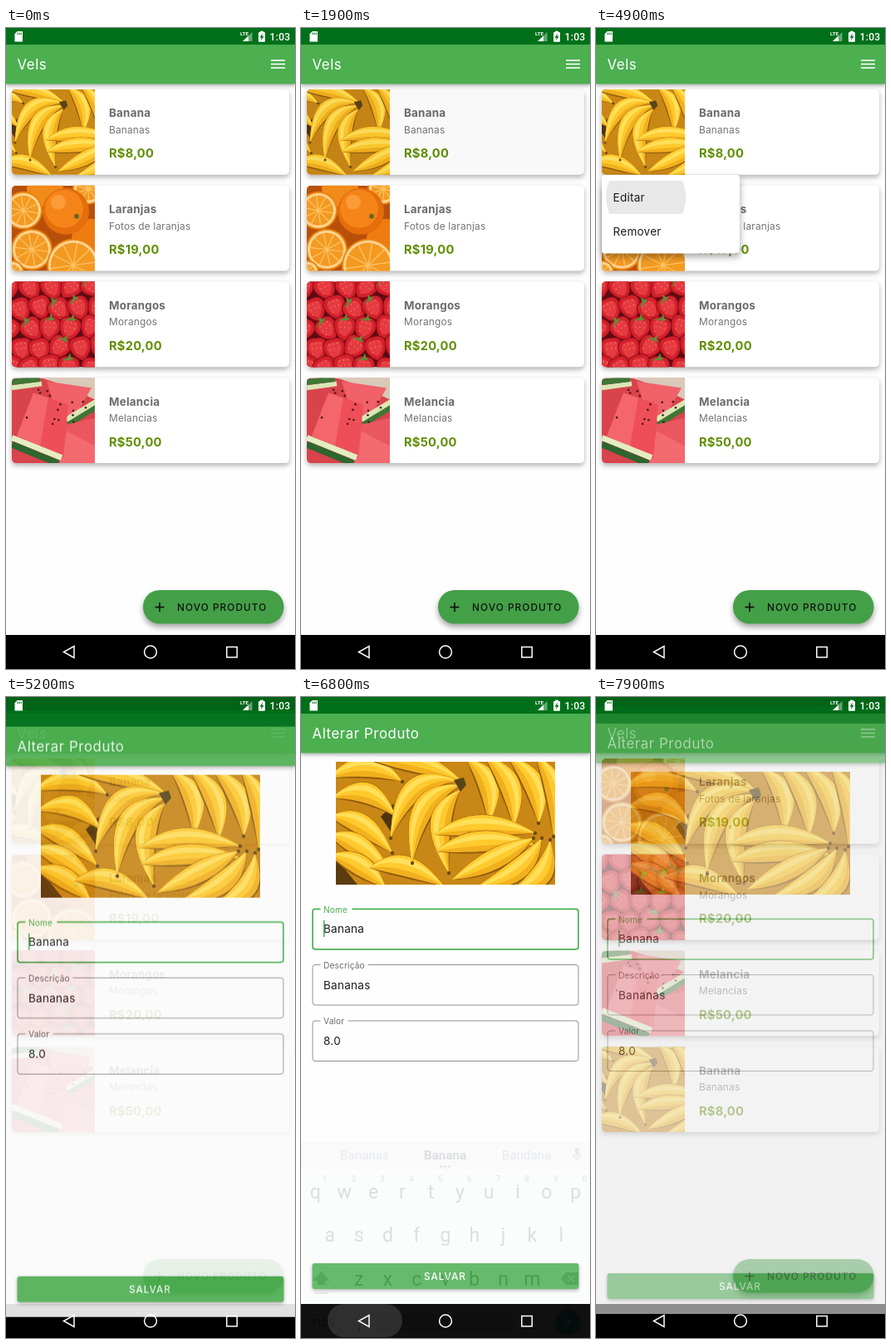
An HTML page with a canvas for the animation above (8 s loop, 348 by 772 pixels).

```html
<!DOCTYPE html>
<html lang="pt-BR">
<head>
<meta charset="utf-8">
<title>Produtos</title>
<style>
html, body { margin: 0; width: 100%; height: 100%; overflow: hidden; background: #fefefe; }
canvas { display: block; width: 348px; height: 772px; }
</style>
</head>
<body>
<canvas id="stage"></canvas>
<script>
const W = 348, H = 772, LOOP = 8000;
const GREEN = '#4caf50', DARK = '#00701a', PAGE = '#fefefe';
const SANS = 'Inter, "Open Sans", sans-serif', KEYS = 'Roboto, sans-serif';
const dpr = window.devicePixelRatio || 1;

function sized(canvas) {
  canvas.width = W * dpr;
  canvas.height = H * dpr;
  const c = canvas.getContext('2d');
  c.scale(dpr, dpr);
  return c;
}
const main = sized(document.getElementById('stage'));
const buffer = sized(document.createElement('canvas'));
let g = main;

const clamp = v => Math.max(0, Math.min(1, v));
const ramp = (t, start, length) => clamp((t - start) / length);
const hash = n => { const v = Math.sin(n * 127.1) * 43758.5453; return v - Math.floor(v); };

// Draws a group with one shared opacity and vertical shift.
function layer(alpha, dy, draw) {
  if (alpha <= 0) return;
  buffer.clearRect(0, 0, W, H);
  g = buffer;
  draw();
  g = main;
  g.save();
  g.globalAlpha = alpha;
  g.drawImage(buffer.canvas, 0, dy, W, H);
  g.restore();
}

function rect(x, y, w, h, color) {
  g.fillStyle = color;
  g.fillRect(x, y, w, h);
}

function roundPath(x, y, w, h, r) {
  g.beginPath();
  g.roundRect(x, y, w, h, r);
}

function round(x, y, w, h, r, color) {
  roundPath(x, y, w, h, r);
  g.fillStyle = color;
  g.fill();
}

function raised(x, y, w, h, r, color, drop, blur, alpha) {
  g.save();
  g.shadowColor = `rgba(0,0,0,${alpha})`;
  g.shadowOffsetY = drop * dpr;
  g.shadowBlur = blur * dpr;
  round(x, y, w, h, r, color);
  g.restore();
}

function disc(x, y, r, color) {
  g.beginPath();
  g.arc(x, y, r, 0, Math.PI * 2);
  g.fillStyle = color;
  g.fill();
}

function poly(color, ...p) {
  g.beginPath();
  for (let i = 0; i < p.length; i += 2) g.lineTo(p[i], p[i + 1]);
  g.closePath();
  g.fillStyle = color;
  g.fill();
}

function line(color, width, ...p) {
  g.beginPath();
  for (let i = 0; i < p.length; i += 2) g.lineTo(p[i], p[i + 1]);
  g.strokeStyle = color;
  g.lineWidth = width;
  g.stroke();
}

// y is the middle of the capital letters
function text(s, x, y, size, color, { weight = 430, track = .02, font = SANS, align = 'left' } = {}) {
  g.font = `${weight} ${size}px ${font}`;
  g.letterSpacing = track * size + 'px';
  g.textAlign = align;
  g.fillStyle = color;
  g.fillText(s, x, y + size * .36);
}

// start, bend and tip of each fruit, back to front
const BANANAS = [
  [-10, 20, 40, -10, 80, 24], [30, -6, 90, -10, 150, 22], [-6, 44, 40, 20, 72, 66],
  [-8, 66, 30, 62, 68, 110], [-8, 88, 24, 90, 66, 134], [-8, 112, 30, 116, 60, 152],
  [40, 128, 80, 112, 130, 150], [150, 24, 84, 6, 66, 92], [152, 28, 92, 34, 92, 122],
  [150, 34, 110, 60, 136, 134], [156, -4, 196, 16, 184, 74], [178, -8, 222, 20, 214, 78],
  [206, -8, 252, 22, 244, 74], [240, -8, 278, 30, 262, 90], [118, 88, 170, 66, 240, 86],
  [120, 108, 170, 88, 240, 100], [140, 142, 196, 116, 238, 92],
  [168, 152, 230, 138, 248, 92], [210, 156, 262, 146, 258, 94]
];

// scene of 264 x 148
function bananas() {
  rect(0, 0, 264, 148, '#c98716');
  poly('#5c3b10', 0, 116, 26, 148, 0, 148);
  poly('#4f3410', 54, 66, 70, 50, 66, 84);
  const crescent = ([ax, ay, bx, by, cx, cy], from, to, color) => {
    const length = Math.hypot(cx - ax, cy - ay), side = cx < ax ? -1 : 1;
    const nx = (cy - ay) / length * side, ny = (ax - cx) / length * side;
    g.beginPath();
    g.moveTo(ax, ay);
    g.quadraticCurveTo(bx + nx * from, by + ny * from, cx, cy);
    g.quadraticCurveTo(bx + nx * to, by + ny * to, ax, ay);
    g.fillStyle = color;
    g.fill();
  };
  for (const b of BANANAS) {
    crescent(b, -28, 26, '#8f5c10');
    crescent(b, -24, 25, '#f2b01e');
    crescent(b, -10, 24, '#ffca2e');
    crescent(b, 4, 17, '#ffe05c');
    disc(b[4], b[5], 2.2, '#6d4a14');
  }
  poly('#5a4416', 142, 22, 154, 19, 157, 28, 150, 36);
}

function slice(x, y, r) {
  disc(x, y, r, '#e9860f');
  disc(x, y, r - 2, '#ffd391');
  disc(x, y, r - 5, '#f39a22');
  for (let i = 0; i < 5; i++) {
    const a = i * Math.PI / 5 + x, c = Math.cos(a) * (r - 5), s = Math.sin(a) * (r - 5);
    line('#ffc566', 1.2, x - c, y - s, x + c, y + s);
  }
}

function oranges() {
  rect(0, 0, 100, 103, '#b9500a');
  disc(40, 4, 22, '#f08a18');
  disc(96, 64, 24, '#ee7c10');
  slice(92, 4, 19);
  slice(14, 30, 23);
  disc(65, 31, 28, '#e56d0c');
  disc(63, 28, 23, '#f58419');
  disc(56, 20, 9, '#fb9c38');
  disc(78, 37, 3, '#6c6a1d');
  slice(24, 77, 25);
  slice(74, 96, 32);
  slice(1, 104, 14);
}

function berry(x, y, turn, leaf) {
  g.save();
  g.translate(x, y);
  g.rotate(turn);
  for (const [k, color] of [[1.08, '#8c0f18'], [1, '#d3202b'], [.7, '#e53a40']]) {
    g.beginPath();
    g.moveTo(0, -12 * k);
    g.bezierCurveTo(20 * k, -14 * k, 13 * k, 10 * k, 0, 16 * k);
    g.bezierCurveTo(-13 * k, 10 * k, -20 * k, -14 * k, 0, -12 * k);
    g.fillStyle = color;
    g.fill();
  }
  for (let i = 0; i < 7; i++) disc((i % 3 - 1) * 5, Math.floor(i / 3) * 6 - 6, .7, '#f08a78');
  if (leaf) for (let i = -2; i < 3; i++) poly('#5d8f3a', -2, -11, i * 5, -17 + Math.abs(i) * 5, 3, -9);
  g.restore();
}

function strawberries() {
  rect(0, 0, 100, 103, '#5d0b12');
  for (let i = 0; i < 25; i++) {
    const col = i % 5, row = Math.floor(i / 5);
    berry(col * 24 + row % 2 * 11 - 4 + hash(i) * 5, row * 24 + 4 + hash(i + 50) * 5,
      hash(i + 90) * 1.8 - .9, hash(i + 7) > .6);
  }
}

function melon() {
  rect(0, 0, 100, 103, '#d9434b');
  poly('#d8c9b8', 36, 0, 100, 0, 100, 26, 66, 10);
  poly('#f0616a', 42, 4, 96, 12, 72, 54, 56, 48);
  line('#dbe6b4', 8, 104, 28, 66, 51);
  line('#3f7636', 6, 104, 34, 68, 56);
  poly('#ea5760', 58, 58, 100, 48, 100, 103, 52, 103);
  poly('#f36a70', 66, 64, 100, 82, 100, 103, 58, 103);
  line('#dbe6b4', 6, 0, 12, 36, 7);
  line('#3f7636', 7, 0, 5, 34, 1);
  poly('#ee4e57', 26, 18, 68, 32, 62, 96, 6, 70);
  poly('#f4666c', 26, 18, 44, 24, 34, 82, 6, 70);
  line('#e4edc2', 7, 0, 72, 60, 96);
  line('#2f6530', 8, 0, 80, 56, 103);
  for (let i = 0; i < 16; i++) disc(16 + hash(i + 3) * 78, 14 + hash(i + 31) * 50, 1.3, '#4a1519');
}

function photo(draw, x, y, w, h, radii, view = [0, 0, 1]) {
  g.save();
  roundPath(x, y, w, h, radii);
  g.clip();
  g.translate(x + view[0], y + view[1]);
  g.scale(view[2], view[2]);
  draw();
  g.restore();
}

const PRODUCTS = [
  ['Banana', 'Bananas', 'R$8,00', bananas, [-42, 0, .696]],
  ['Laranjas', 'Fotos de laranjas', 'R$19,00', oranges],
  ['Morangos', 'Morangos', 'R$20,00', strawberries],
  ['Melancia', 'Melancias', 'R$50,00', melon]
];

// Fills the page and returns the painter of its title bar.
function page(title) {
  rect(0, 0, W, H, PAGE);
  return () => {
    raised(0, 20, W, 47.5, 0, GREEN, 2, 4, .28);
    rect(0, 0, W, 20, DARK);
    text(title, 13.5, 44, 16.8, '#fff', { track: .035 });
  };
}

function card([name, info, price, draw, view], y, pressed) {
  raised(7, y, 334, 102.7, 5, '#fff', 3, 6, .3);
  photo(draw, 7, y, 100, 102.7, [5, 0, 0, 5], view);
  text(name, 124, y + 28.5, 13.4, '#6b6b6b', { weight: 700, track: .017 });
  text(info, 124, y + 48.5, 11.9, '#747474', { track: .015 });
  text(price, 124, y + 77, 14.7, '#5f8f00', { weight: 700, track: .015 });
  if (pressed > 0) round(7, y, 334, 102.7, 5, `rgba(0,0,0,${.024 * pressed})`);
}

function list(t) {
  const bar = page('Vels');
  const items = t < 6000 ? PRODUCTS : [...PRODUCTS.slice(1), PRODUCTS[0]];
  const pressed = ramp(t, 1780, 100) - ramp(t, 2400, 250);
  items.forEach((p, i) => card(p, 74 + i * 115.8, i ? 0 : pressed));
  bar();
  for (const y of [39, 43.5, 48]) line('#fff', 1.6, 319, y, 336, y);
  raised(165, 677, 169.5, 40.5, 20, '#43a047', 4, 7, .36);
  line('#111', 1.7, 179.5, 697.5, 190.5, 697.5);
  line('#111', 1.7, 185, 692, 185, 703);
  text('NOVO PRODUTO', 206, 697.5, 11.8, '#111', { weight: 500, track: .09 });
  rect(0, 731, W, 41, '#000');
}

function menu(t) {
  const open = 1 - (1 - ramp(t, 2360, 200)) ** 3;
  layer(open * (1 - ramp(t, 4980, 130)), 0, () => {
    const h = 24 + 70.5 * open, press = ramp(t, 4860, 160);
    raised(7, 177, 166, h, 3, '#fff', 4, 8, .36);
    g.save();
    g.beginPath();
    g.rect(7, 177, 166, h);
    g.clip();
    text('Editar', 20.5, 204, 13.5, '#1c1c1c');
    text('Remover', 20.5, 245, 13.5, '#1c1c1c');
    g.beginPath();
    g.rect(7, 184, 166, 40);
    g.clip();
    if (press > 0) disc(60, 204, 20 + 110 * press, 'rgba(0,0,0,.09)');
    g.restore();
  });
}

function field(label, value, y, gap, active) {
  roundPath(14, y, 320, 48.5, 3);
  g.strokeStyle = active ? GREEN : '#929292';
  g.lineWidth = active ? 1.7 : 1;
  g.stroke();
  rect(23.5, y - 2, gap, 4, PAGE);
  text(label, 27, y + .6, 10.2, active ? GREEN : '#6a6a6a', { track: .012 });
  text(value, 27, y + 24.3, 13.5, '#1c1c1c');
}

function form(t, keyboardUp) {
  const bar = page('Alterar Produto');
  photo(bananas, 42, 78, 264, 148, 0);
  field('Nome', 'Banana', 255.3, 38, true);
  field('Descrição', 'Bananas', 322.5, 57, false);
  field('Valor', '8.0', 390, 33, false);
  const cursor = t < 5700 || t >= 6700 && t < 7200 || t >= 7700;
  if (cursor) rect(27, 269, 1.5, 20, GREEN);
  if (t >= 6000 && t < 6700) rect(27, 285.5, 50.5, 1, '#333');

  g.save();
  g.beginPath();
  g.rect(0, 60, W, keyboardUp ? 423 : 671);
  g.clip();
  const y = keyboardUp ? 458 : 682;
  raised(13.5, y, 321, 31, 3, GREEN, 2, 4, .32);
  const press = ramp(t, 7580, 220);
  if (press > 0) {
    g.save();
    roundPath(13.5, y, 321, 31, 3);
    g.clip();
    disc(174, y + 15, 190 * press, 'rgba(255,255,255,.1)');
    g.restore();
  }
  text('SALVAR', 148, y + 15.5, 11.8, '#fff', { weight: 500, track: .08 });
  g.restore();
  if (keyboardUp) rect(344, 68, 4, 391, `rgba(0,0,0,${.3 * (1 - ramp(t, 6350, 250))})`);
  bar();
  rect(0, 731, W, 41, '#000');
}

function keyboard(t) {
  const ink = '#37474f', soft = '#78868c';
  const key = (s, x, y, size = 23, color = ink, weight = 400) =>
    text(s, x, y, size, color, { weight, track: 0, font: KEYS, align: 'center' });
  rect(0, 483, W, 289, '#eceff1');
  rect(0, 483, W, 34, '#e5e8eb');
  if (t >= 5950) {
    key('Bananas', 76.5, 500, 15.2, soft);
    key('Banana', 173.5, 500, 15.2, ink, 700);
    key('Bandana', 271.5, 500, 15.2, soft);
    for (const x of [168.5, 173.5, 178.5]) disc(x, 513.5, 1.3, ink);
    for (const x of [122, 225]) rect(x, 490, 1, 20, '#cfd5d8');
  }
  round(330, 491, 5, 10, 2.5, soft);
  g.beginPath();
  g.arc(332.5, 498.5, 5, 0, Math.PI);
  g.strokeStyle = soft;
  g.lineWidth = 1.3;
  g.stroke();
  line(soft, 1.5, 332.5, 503, 332.5, 507);

  [...'qwertyuiop'].forEach((c, i) => {
    key(c, 17.4 + 34.8 * i, 544);
    key(String((i + 1) % 10), 28.5 + 34.8 * i, 528, 10, soft, 500);
  });
  [...'asdfghjkl'].forEach((c, i) => key(c, 34.8 * (i + 1), 596));
  [...'zxcvbnm'].forEach((c, i) => key(c, 69.6 + 34.8 * i, 649));
  poly(soft, 24.5, 640, 35, 651, 29, 651, 29, 656, 20, 656, 20, 651, 14, 651);
  rect(16, 665, 16, 1.7, soft);
  poly(soft, 313, 648.5, 319, 641, 334, 641, 334, 656, 319, 656);
  line('#eceff1', 1.6, 321.5, 645, 329, 652);
  line('#eceff1', 1.6, 329, 645, 321.5, 652);
  key('?123', 26, 701.5, 13.5, '#55646b');
  key(',', 70, 701, 22);
  round(90, 691, 168, 20.5, 2, '#cfd3d8');
  key('.', 278, 701, 22);
  disc(321.5, 701, 15.2, '#4db6ac');
  line('#fff', 1.8, 319, 696, 324, 701, 319, 706);
}

function statusIcons() {
  poly('#fff', 13.5, 4, 20, 4, 20, 16.5, 10.5, 16.5, 10.5, 7.3);
  for (const x of [13.5, 15.6, 17.7]) rect(x, 5.5, 1, 2.6, DARK);
  text('LTE', 282, 6.5, 6.2, '#fff', { weight: 700, font: KEYS, track: 0 });
  poly('rgba(255,255,255,.4)', 296.5, 5, 296.5, 16, 285, 16);
  poly('#fff', 292, 9.5, 292, 16, 285, 16);
  round(304, 5, 8, 11.8, 1, '#fff');
  rect(306, 3.7, 4, 2, '#fff');
  poly(DARK, 309, 6.5, 305.6, 11.5, 307.6, 11.5, 307, 15, 310.5, 10, 308.4, 10);
  text('1:03', 317.5, 10.5, 12.2, '#fff', { weight: 500, font: KEYS, track: .02 });
}

function navIcons(t, keyboardUp) {
  const press = ramp(t, 6600, 100) - ramp(t, 6850, 250);
  if (press > 0) round(32, 731, 90, 40, 20, `rgba(255,255,255,${.13 * press})`);
  g.strokeStyle = '#fff';
  g.lineWidth = 1.5;
  g.beginPath();
  const tri = keyboardUp ? [69, 746, 83, 746, 76, 758] : [82, 744.5, 82, 758.5, 69.5, 751.5];
  for (let i = 0; i < 6; i += 2) g.lineTo(tri[i], tri[i + 1]);
  g.closePath();
  g.stroke();
  g.beginPath();
  g.arc(174, 751.5, 7.4, 0, Math.PI * 2);
  g.stroke();
  g.strokeRect(265.8, 745.5, 12.4, 12.4);
  if (!keyboardUp) return;
  round(314.5, 746, 16.5, 11.5, 1.5, '#fff');
  for (let i = 0; i < 10; i++) rect(316.5 + i % 5 * 2.8, 748 + Math.floor(i / 5) * 2.8, 1.4, 1.4, '#000');
  rect(319, 754, 7.5, 1.5, '#000');
}

function draw(t) {
  const keyboardUp = t >= 5650 && t < 6700;
  list(t);
  menu(t);
  if (t >= 5117) {
    // the list dims while covered and brightens again on return
    const dim = .3 * (ramp(t, 5117, 217) - ramp(t, 7735, 250));
    rect(0, 0, W, H, `rgba(0,0,0,${dim})`);
    const enter = (1 - ramp(t, 5117, 350)) ** 5, leave = ramp(t, 7735, 250) ** 4;
    const alpha = 1 - (1 - ramp(t, 5117, 200)) ** 4 - ramp(t, 7835, 150);
    layer(alpha, H * .08 * (enter + leave), () => form(t, keyboardUp));
  }
  if (t >= 5650 && t < 6850) {
    const show = ramp(t, 5650, 200), hide = ramp(t, 6700, 150);
    const shift = H * (.2 * (1 - show) ** 5 + .1 * hide);
    layer(show * (1 - hide) ** 1.6, shift, () => keyboard(t));
    rect(0, 731, W, 41, hide > 0 ? 'rgba(0,0,0,.6)' : '#000');
  }
  statusIcons();
  navIcons(t, keyboardUp);
}

const start = performance.now();
function tick(now) {
  draw(Math.max(0, now - start) % LOOP);
  requestAnimationFrame(tick);
}
tick(start);
</script>
</body>
</html>
```
